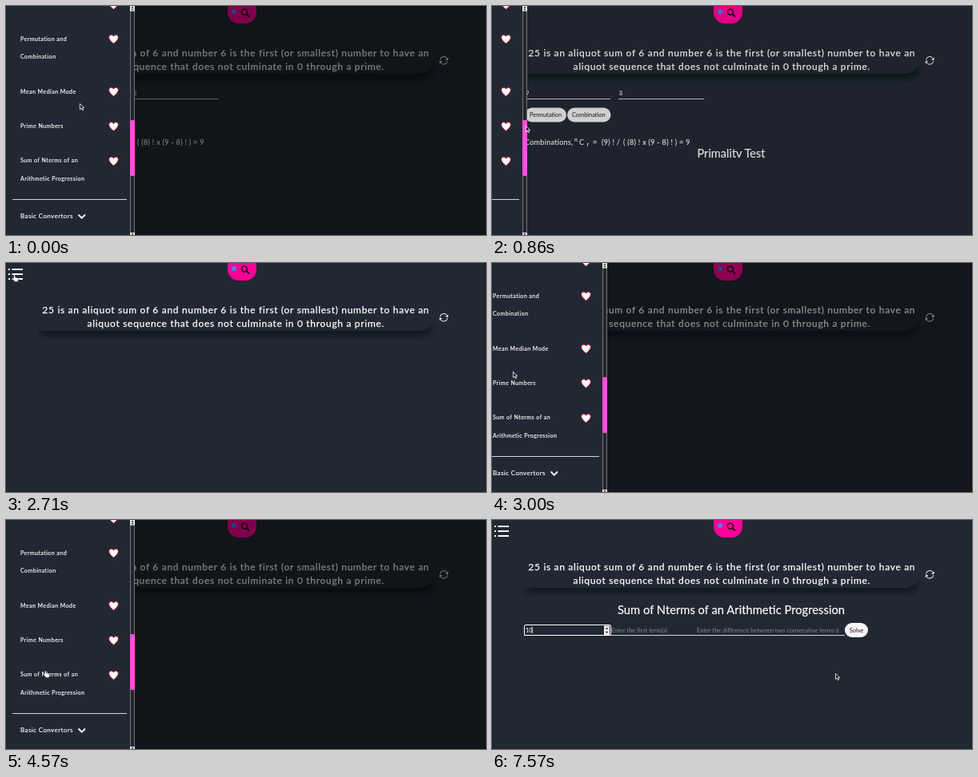
Write an HTML page that moves like this. It is 600 px wide and 287 px high and loops after 8 s.

```html
<!DOCTYPE html>
<html lang="en">
<head>
<meta charset="utf-8">
<title>Maths calculators</title>
<style>
html, body { margin: 0; height: 100%; overflow: hidden; background: #222833; }
svg { display: block; width: 100vw; height: 100vh; font-family: Lato, "Open Sans", sans-serif; }
text { fill: #fff; white-space: pre; }
.fact { font-size: 12px; letter-spacing: .685px; text-anchor: middle; stroke: #fff; stroke-width: .25px; }
.title { font-size: 14.75px; text-anchor: middle; stroke: #fff; stroke-width: .15px; }
.small { font-size: 7.4px; }
.hint text { fill: #85888f; letter-spacing: .04px; }
.small .dark, .dark { fill: #14161c; }
.formula { font-size: 9px; letter-spacing: .3px; stroke: #fff; stroke-width: .12px; }
.menu { font-size: 7px; letter-spacing: .47px; stroke: #fff; stroke-width: .15px; }
.line { fill: none; stroke: #fff; }
</style>
</head>
<body>
<svg viewBox="0 0 600 287" preserveAspectRatio="none">
  <defs>
    <filter id="soft" x="-10%" y="-60%" width="120%" height="260%"><feGaussianBlur stdDeviation="2.8"/></filter>
    <clipPath id="field"><path d="M256 128h178v16h-178z"/></clipPath>
    <clipPath id="reveal"><path d="M200 95h200v95h-200z"/></clipPath>
    <path id="heart" d="M0 5.6C-3 3-5.8.6-5.8-2.2C-5.8-5.6-1.6-6.6 0-3.4C1.6-6.6 5.8-5.6 5.8-2.2C5.8.6 3 3 0 5.6Z" fill="#fff" stroke="#d3122f" stroke-width=".9"/>
    <path id="turn" class="line" d="M-4.600-.8A4.600 4.600 0 0 1 4.500-1M5.200-3.400L4.700-.6L2.200-1.600"/>
  </defs>
  <rect width="600" height="287" fill="#222833"/>

  <g class="line" stroke-width="2">
    <path d="M7.500 8H21M7.500 14H21M7.500 20H21"/>
    <path d="M3 8h2M3 14h2M3 20h2"/>
  </g>

  <rect x="277" y="-14" width="36" height="36" rx="14" fill="#ff0096"/>
  <circle cx="285" cy="7" r="3" fill="#4285f4"/>
  <g fill="none" stroke="#16060f"><circle cx="298" cy="7.500" r="3.500" stroke-width="1.400"/><path d="M300.700 10.200l3.300 3.300" stroke-width="1.800"/></g>

  <path d="M44 78H534Q533 92 515 92H50Q44 92 43 87Z" fill="#10131b" opacity=".75" filter="url(#soft)"/>
  <path d="M41 48H533V66Q533 85 514 85H46Q41 85 41 80Z" fill="#222833"/>
  <text class="fact" x="287.300" y="63">25 is an aliquot sum of 6 and number 6 is the first (or smallest) number to have an</text>
  <text class="fact" x="287.300" y="80">aliquot sequence that does not culminate in 0 through a prime.</text>
  <g transform="translate(547.200 68.300)"><use href="#turn"/><use href="#turn" transform="rotate(180)"/></g>

  <g id="combo">
    <path class="line" d="M41 116.500H148M158 116.500H265" opacity=".75"/>
    <g class="small"><text x="42" y="112">9</text><text x="159" y="112">8</text></g>
    <rect x="41" y="127.500" width="52" height="18" rx="9" fill="#ececec"/>
    <rect x="94" y="127.500" width="54.500" height="18" rx="9" fill="#ececec"/>
    <g class="small"><text class="dark" x="47" y="139">Permutation</text><text class="dark" x="100" y="139">Combination</text></g>
    <g class="formula">
      <text x="41" y="174">Combinations,</text>
      <text x="103" y="170" font-size="7">n</text><text x="109" y="174">C</text><text x="118.500" y="176" font-size="7">r</text>
      <text x="126" y="174">=</text><text x="137" y="174">(9) ! /</text>
      <text x="164" y="174">( (8) ! x (9 - 8) ! ) = 9</text>
    </g>
  </g>

  <g clip-path="url(#reveal)"><text id="prime" class="title" x="299" y="190" style="font-size:14.5px">Primality Test</text></g>

  <g id="sum">
    <text class="title" x="299" y="118">Sum of Nterms of an Arithmetic Progression</text>
    <path class="line" d="M40 144.500H441" opacity=".8"/>
    <g class="small hint">
      <text id="hint" x="42" y="140.500">Enter the Nterms  (n)</text>
      <text x="149" y="140.500">Enter the first term(a)</text>
      <text x="256" y="140.500" clip-path="url(#field)">Enter the difference between two consecutive terms (d)</text>
    </g>
    <text id="typed" class="small" x="42" y="140.500"></text>
    <g id="focus">
      <rect class="line" x="40.500" y="131.500" width="108" height="13" rx="1.500"/>
      <rect x="140" y="132.500" width="7" height="11.500" fill="#f2f2f2"/>
      <path d="M141.500 136.800l2-2.400l2 2.400zM141.500 139.700l2 2.400l2-2.400z" fill="#333"/>
    </g>
    <rect id="caret" y="133.500" width=".8" height="8.500" fill="#fff"/>
    <rect x="441" y="129" width="29" height="18" rx="9" fill="#f5f7fa"/>
    <text class="small dark" x="446.800" y="140.500">Solve</text>
  </g>

  <rect id="shade" width="600" height="287"/>

  <g id="drawer">
    <rect width="161" height="287" fill="#222833"/>
    <g class="menu">
      <text x="18" y="43.500">Permutation and</text><text x="18" y="66.300">Combination</text>
      <text x="18" y="109.500">Mean Median Mode</text>
      <text x="18" y="153">Prime Numbers</text>
      <text x="18" y="196.300">Sum of Nterms of an</text><text x="18" y="219">Arithmetic Progression</text>
      <text x="18" y="266" style="font-size:8px;letter-spacing:.4px">Basic Convertors</text>
    </g>
    <use href="#heart" x="134.500" y="-1.500"/><use href="#heart" x="134.500" y="41.500"/>
    <use href="#heart" x="134.500" y="107.500"/><use href="#heart" x="134.500" y="151"/><use href="#heart" x="134.500" y="194.500"/>
    <path class="line" d="M8 242.500H151" opacity=".8"/>
    <path class="line" d="M90.500 261.500L94.700 265.700L99 261.500" stroke-width="1.800"/>
    <rect x="155" width="6" height="287" fill="#24262c"/>
    <path class="line" d="M155.500 0V287M160.500 0V287" opacity=".35"/>
    <path d="M155 0h6v6.500h-6zM155 284h6v3h-6z" fill="#eee"/>
    <path d="M156.300 2.500h3.400l-1.700-2zM156.300 3.800h3.400l-1.700 2zM156.300 285h3.400l-1.700 2z" fill="#222"/>
    <rect x="155" y="143" width="6" height="70" rx="2" fill="#ff4fdf"/>
  </g>

  <g id="cursor">
    <path id="arrow" d="M.4.4V7.600L2.200 6L3.400 8.800L4.700 8.200L3.500 5.600H5.700Z" fill="#14161c" stroke="#fff" stroke-width=".8"/>
    <path id="hand" d="M1.200 0Q2.300-.2 2.400 1V3L5.900 3.700Q6.800 4 6.600 5.200L5.800 8.500H2L-.6 5.200Q-.4 4 .5 4.600V1Q.5.100 1.200 0Z" fill="#fff" stroke="#14161c" stroke-width=".4"/>
    <path id="beam" class="line" d="M-1.600-4H1.600M0-4V4M-1.600 4H1.600" stroke-width=".9"/>
  </g>
</svg>
<script>
const LOOP = 8000, RATE = 7; // the picture advances seven times a second
const $ = id => document.getElementById(id);
const show = (id, on) => $(id).style.display = on ? '' : 'none';
const within = (s, a, b) => s >= a && s <= b;

// Keys are [step, value, ...]; values move linearly between them.
const slide = [[0, 0], [5, 0], [6, -117], [7, -165], [20, -165], [21, -17], [22, 0],
               [32, 0], [33, -117], [34, -165]];
const pointer = [[0, 92, 122], [5, 42, 150], [9, 42, 150], [16, 26, 81], [19, 9, 15], [20, 9, 15],
                 [21, 26, 136], [23, 26, 136], [28, 48, 189], [36, 48, 189], [39, 50, 132],
                 [40, 50, 132], [42, 429, 192]];
const primeFade = [[0, 1], [13, 1], [16, 0]];

function at(keys, s) {
  const i = keys.findIndex(k => k[0] > s);
  if (i < 0) return keys[keys.length - 1].slice(1);
  const a = keys[i - 1], b = keys[i], p = (s - a[0]) / (b[0] - a[0]);
  return a.slice(1).map((v, j) => v + (b[j + 1] - v) * p);
}

function draw(ms) {
  const s = Math.floor((ms % LOOP + 5) * RATE / 1000);

  const [x] = at(slide, s);
  $('drawer').setAttribute('transform', `translate(${x})`);
  $('shade').setAttribute('opacity', Math.max(0, .5 * (1 + x / 155)));

  show('combo', s < 7);
  show('prime', within(s, 6, 16));
  $('prime').setAttribute('y', s < 7 ? 190 : 118);
  $('prime').setAttribute('opacity', at(primeFade, s)[0]);

  const typed = s < 52 ? '' : s < 53 ? '1' : '10';
  show('sum', s >= 33);
  show('focus', s >= 40);
  show('hint', !typed);
  $('typed').textContent = typed;
  show('caret', within(s, 40, 43) || s >= 48);
  $('caret').setAttribute('x', 41.6 + typed.length * 4.1);

  const [cx, cy] = at(pointer, s);
  const hand = within(s, 19, 20) || within(s, 27, 37), beam = within(s, 38, 40);
  $('cursor').setAttribute('transform', `translate(${cx} ${cy})`);
  show('cursor', !within(s, 17, 18));
  show('hand', hand);
  show('beam', beam);
  show('arrow', !hand && !beam);
}

const start = performance.now();
function tick() {
  draw(performance.now() - start);
  requestAnimationFrame(tick);
}
tick();
</script>
</body>
</html>
```
